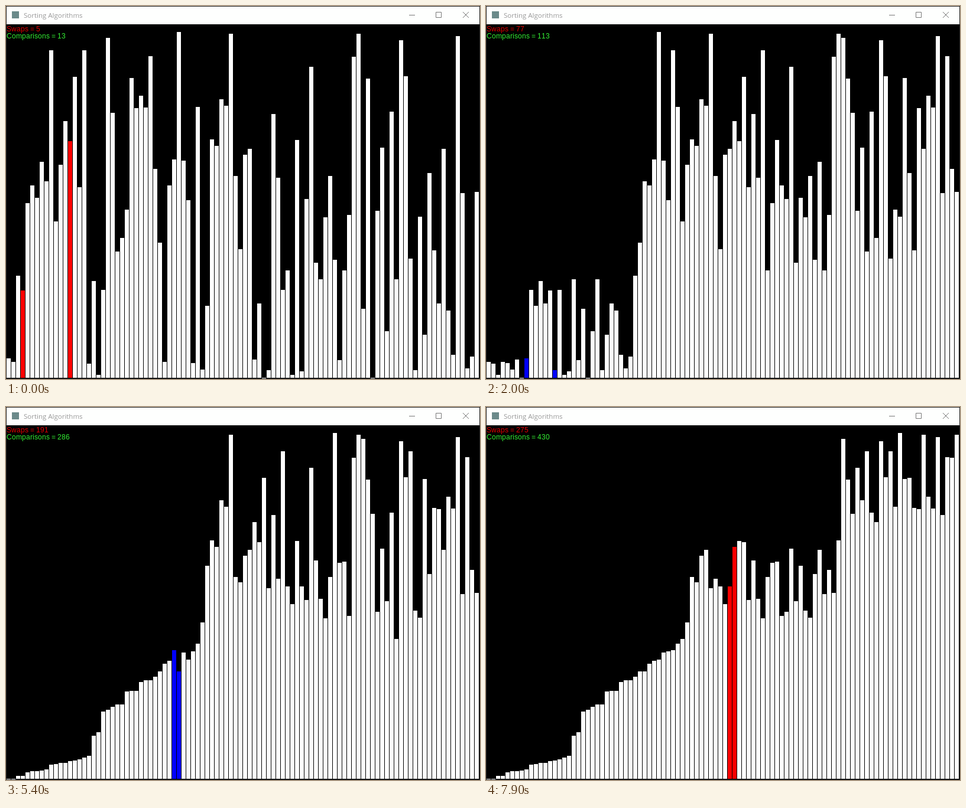
These frames come from a looping animation (802x632 px, 8 s). An HTML page with a canvas:

```html
<!DOCTYPE html>
<html lang="en">
<head>
<meta charset="utf-8">
<title>Sorting Algorithms</title>
<style>
  html, body { margin: 0; width: 100%; height: 100%; overflow: hidden; background: #000; }
  canvas { display: block; }
</style>
</head>
<body>
<canvas id="stage" width="802" height="632"></canvas>
<script>
const ctx = document.getElementById('stage').getContext('2d');
const LOOP = 8000, TICK = 100, FLOOR = 630;

// Top edge of each bar before sorting; a larger number is a shorter bar.
const start = [
  457, 229, 597, 603, 334, 304, 325, 264, 297, 75, 365, 269, 195, 482, 120, 307, 75, 606, 466, 625,
  481, 54, 181, 416, 393, 345, 122, 173, 152, 172, 85, 276, 401, 603, 304, 260, 44, 262, 329, 605,
  171, 616, 508, 226, 237, 158, 169, 47, 288, 412, 252, 242, 599, 504, 630, 617, 183, 291, 481, 448,
  625, 227, 619, 327, 103, 435, 463, 358, 288, 430, 600, 448, 354, 86, 47, 513, 123, 630, 347, 240,
  551, 179, 463, 58, 119, 428, 617, 357, 557, 283, 414, 504, 242, 516, 591, 51, 317, 614, 594, 315
];

// Time in ms and the number of sorting operations done by then.
const pace = [[0, 18], [1300, 131], [2900, 266], [4400, 390], [5400, 477], [6500, 585], [7900, 705]];

// Quicksort that carries its pivot along, keeping a snapshot after each operation.
function record(tops) {
  const steps = [{ tops: [...tops], marks: [], swaps: 0, comparisons: 0 }];
  let swaps = 0, comparisons = 0;

  const snap = (color, ...marks) => steps.push({ tops: [...tops], marks, color, swaps, comparisons });

  function swap(i, j) {
    if (i === j) return;
    [tops[i], tops[j]] = [tops[j], tops[i]];
    swaps++;
    snap('#f00', i, j);
  }

  function sort(lo, hi) {
    if (lo >= hi) return;
    let pivot = lo;
    for (let j = lo + 1; j <= hi; j++) {
      comparisons++;
      snap('#00f', pivot, j);
      if (tops[j] > tops[pivot]) {
        swap(pivot + 1, j);
        swap(pivot, pivot + 1);
        pivot++;
      }
    }
    sort(lo, pivot - 1);
    sort(pivot + 1, hi);
  }

  sort(0, tops.length - 1);
  return steps;
}

const steps = record([...start]);

function stepAt(time) {
  const k = pace.findIndex(([t]) => t > time);
  if (k < 0) return pace[pace.length - 1][1];
  const [t0, n0] = pace[k - 1], [t1, n1] = pace[k];
  return Math.round(n0 + (n1 - n0) * (time - t0) / (t1 - t0));
}

function rect(color, x, y, w, h) {
  ctx.fillStyle = color;
  ctx.fillRect(x, y, w, h);
}

// Text whose letters advance by whole pixels.
function label(text, y, color) {
  ctx.font = '12px "Liberation Sans", Arial, sans-serif';
  ctx.fillStyle = color;
  let x = 1;
  for (const c of text) {
    ctx.fillText(c, x, y);
    x += Math.round(ctx.measureText(c).width);
  }
}

function drawWindow() {
  rect('#222', 0, 0, 802, 632);
  rect('#fefffe', 1, 1, 800, 30);
  rect('#000', 1, 31, 800, 600);
  rect('#6b8a8a', 10, 9, 12, 12);

  ctx.font = '11.5px "Open Sans", "Noto Sans", sans-serif';
  ctx.fillStyle = '#999';
  ctx.fillText('Sorting Algorithms', 30, 20);

  ctx.strokeStyle = '#777';
  ctx.lineWidth = 1;
  ctx.beginPath();
  ctx.moveTo(682, 15.5);
  ctx.lineTo(692, 15.5);
  ctx.rect(727.5, 10.5, 9, 9);
  ctx.moveTo(773, 10);
  ctx.lineTo(783, 20);
  ctx.moveTo(783, 10);
  ctx.lineTo(773, 20);
  ctx.stroke();
}

function draw(step) {
  drawWindow();
  step.tops.forEach((top, i) => {
    const color = step.marks.includes(i) ? step.color : '#fff';
    rect(color, 1 + 8 * i, top, 7, Math.max(1, FLOOR - top));
  });
  label('Swaps = ' + step.swaps, 43, '#e00000');
  label('Comparisons = ' + step.comparisons, 55, '#33ee33');
}

function frame() {
  const time = performance.now() % LOOP;
  draw(steps[stepAt(Math.floor(time / TICK) * TICK)]);
  requestAnimationFrame(frame);
}
frame();
</script>
</body>
</html>
```
